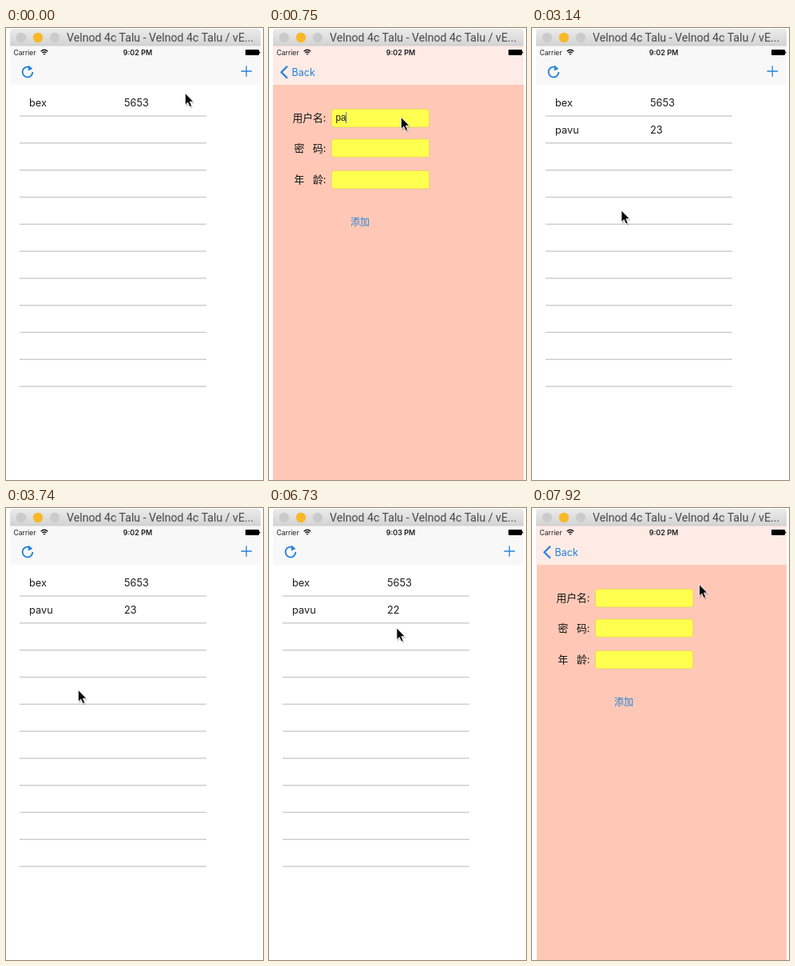
Write an HTML page that moves like this. It is 322 px wide and 565 px high and loops after 8020 ms.

```html
<!DOCTYPE html>
<html lang="zh">
<head>
<meta charset="utf-8">
<title>User list demo</title>
<style>
html, body { margin: 0; width: 100%; height: 100%; overflow: hidden; background: #fff; }
svg { display: block; width: 322px; height: 565px; }
text { font-family: Inter, "Noto Sans CJK SC", "Noto Sans CJK", sans-serif; white-space: pre; fill: #1c1c1c; }
.title { font: 14.15px Roboto, sans-serif; fill: #484848; }
.status { font-size: 8.6px; }
.clock { font-size: 9px; font-weight: 600; text-anchor: middle; }
.cell { font-size: 12.8px; }
.label { font-size: 12.8px; text-anchor: end; fill: #111; }
.value { font: 11.9px "Liberation Sans", Arial, sans-serif; }
.button { font-size: 12px; fill: #2583d8; }
.back { font-size: 12.6px; fill: #1f80dc; }
.icon { fill: none; stroke: #2583dc; }
</style>
</head>
<body>
<svg viewBox="0 0 322 565">
  <defs>
    <linearGradient id="chrome" x2="0" y2="1">
      <stop offset="0" stop-color="#ebebeb"/><stop offset="1" stop-color="#d3d3d3"/>
    </linearGradient>
  </defs>
  <g id="page"></g>
  <path d="M5 22V5Q5 1 9 1H315Q319 1 319 5V22Z" fill="url(#chrome)"/>
  <path d="M5 22H319" stroke="#c4c4c4" stroke-width=".7"/>
  <g fill="#cbcbcb">
    <circle cx="19" cy="12" r="6.2"/>
    <circle cx="40" cy="12" r="6.2" fill="#f8b829"/>
    <circle cx="61" cy="12" r="6.2"/>
  </g>
  <text class="title" x="76" y="17">Velnod 4c Talu - Velnod 4c Talu / vE...</text>
  <text class="status" x="9.5" y="33.5">Carrier</text>
  <g fill="none" stroke="#111" stroke-width="1.3">
    <path d="M43.7 29.2Q48 25.3 52.3 29.2M45.4 31.1Q48 28.8 50.6 31.1"/>
    <path d="M47 32.4H49L48 33.6Z" fill="#111" stroke-width=".6"/>
  </g>
  <text class="clock" id="clock" x="165" y="33.6"></text>
  <rect x="300" y="27" width="17" height="7" rx="1" fill="#000"/>
  <rect x="317" y="29.3" width="1.3" height="2.5" fill="#222"/>
  <g id="pointer">
    <path d="M1 2V17L4.5 13.8L6.8 19L9.5 17.8L7.3 12.8H12Z" fill="#000" opacity=".2"/>
    <path d="M0 0V14.6L3.3 11.6L5.7 17L8.2 15.9L5.9 10.6H10.3Z" fill="#080808" stroke="#fff" stroke-width=".8"/>
  </g>
</svg>
<script>
const LOOP = 8020;
const [page, clock, pointer] = ['page', 'clock', 'pointer'].map(id => document.getElementById(id));

const text = (cls, x, y, str) => `<text class="${cls}" x="${x}" y="${y}">${str}</text>`;
const box = (x, y, w, h, fill, extra = '') =>
  `<rect x="${x}" y="${y}" width="${w}" height="${h}" fill="${fill}" ${extra}/>`;

function list(...users) {
  let out = box(5, 22, 314, 49, '#f8f8f8') +
    `<g class="icon"><path d="M30.5 49.7A6.4 6.4 0 1 0 33.4 55" stroke-width="1.9"/>
     <path d="M28 46.6L33.4 51L27.8 53.4Z" fill="#2583dc" stroke="none"/>
     <path d="M294.5 54H308M301.2 47.3V60.7" stroke-width="1.3"/></g>`;
  for (let i = 0; i < 11; i++) out += box(17, 109.4 + i * 33.8, 234, 1.3, '#c8c8c8');
  users.forEach(([name, age], i) => {
    const y = 97.7 + i * 33.8;
    out += text('cell', 29, y, name) + text('cell', 148, y, age);
  });
  return out;
}

function fields(values, focus, fill) {
  return ['用户名:', '密   码:', '年   龄:'].map((label, i) => {
    const y = [101, 138.5, 178][i];
    return text('label', 71.5, y + 16, label) +
      box(78.3, y + .3, 122.6, 22.6, fill, 'rx="4" stroke="#8a7a40" stroke-opacity=".25" stroke-width=".8"') +
      `<text class="value${i === focus ? ' focus' : ''}" x="83.4" y="${y + 15.2}">${values[i] || ''}</text>`;
  }).join('');
}

const nav = '<path class="icon" d="M23 47.8L15.5 55.3L23 62.8" stroke-width="2.3"/>' + text('back', 28.5, 60, 'Back');

const addForm = (values, focus, shift = 0) =>
  box(5 + shift, 71, 314 - shift, 494, '#ffc8b6') + box(5, 22, 314, 49, '#ffebe5') + nav +
  `<g transform="translate(${shift})">${fields(values, focus, '#ffff50')}${text('button', 102, 246.7, '添加')}</g>`;

const editForm = (values, focus) =>
  box(5, 22, 314, 215, '#fcfcfc') + nav +
  `<g transform="translate(7 -12.6)">${fields(values, focus, '#ffff3c')}</g>` +
  text('button', 75, 234.3, '修改') + text('button', 135, 234.3, '删除');

const first = ['bex', '5653'], name = 'pavu', pass = '333333';

// start time, pointer tip, page markup
const scenes = [
  [0, 224.5, 81.5, list(first)],
  [150, 209.5, 95.5, addForm([], -1, 1)],
  [750, 165.5, 111.5, addForm(['pa'], 0)],
  [1350, 150, 150, addForm([name, '333'], 1)],
  [1950, 135, 190, addForm([name, pass], 2)],
  [2540, 125.5, 222.5, addForm([name, pass, '23'], 2)],
  [3140, 112, 228, list(first, [name, '23'])],
  [3740, 90.5, 227.5, list(first, [name, '23'])],
  [4330, 102, 130, editForm([name, pass, '23'], -1)],
  [4930, 121, 169, editForm([name, pass, '2'], 2)],
  [5530, 122, 168.5, editForm([name, pass, '22'], 2)],
  [6130, 92, 218, editForm([name, pass, '22'], -1)],
  [6730, 160, 150, list(first, [name, '22'])],
  [7320, 208.5, 95.5, list(first, [name, '22'])],
  [7920, 209.5, 95.5, addForm([], -1, 1)]
];

function addCaret() {
  const input = page.querySelector('.focus');
  if (!input) return;
  const x = 83 + input.getComputedTextLength();
  input.insertAdjacentHTML('afterend', box(x, input.getAttribute('y') - 11, 1, 14, '#4a63c8'));
}

let shown;
function draw(now) {
  const t = now % LOOP;
  const scene = scenes.findLast(s => s[0] <= t);
  if (scene !== shown) {
    const [start, x, y, markup] = shown = scene;
    page.innerHTML = markup;
    addCaret();
    clock.textContent = start >= 6730 && start < 7920 ? '9:03 PM' : '9:02 PM';
    pointer.setAttribute('transform', `translate(${x} ${y})`);
  }
}

const origin = performance.now();
function tick() {
  draw(performance.now() - origin);
  requestAnimationFrame(tick);
}
tick();
</script>
</body>
</html>
```
